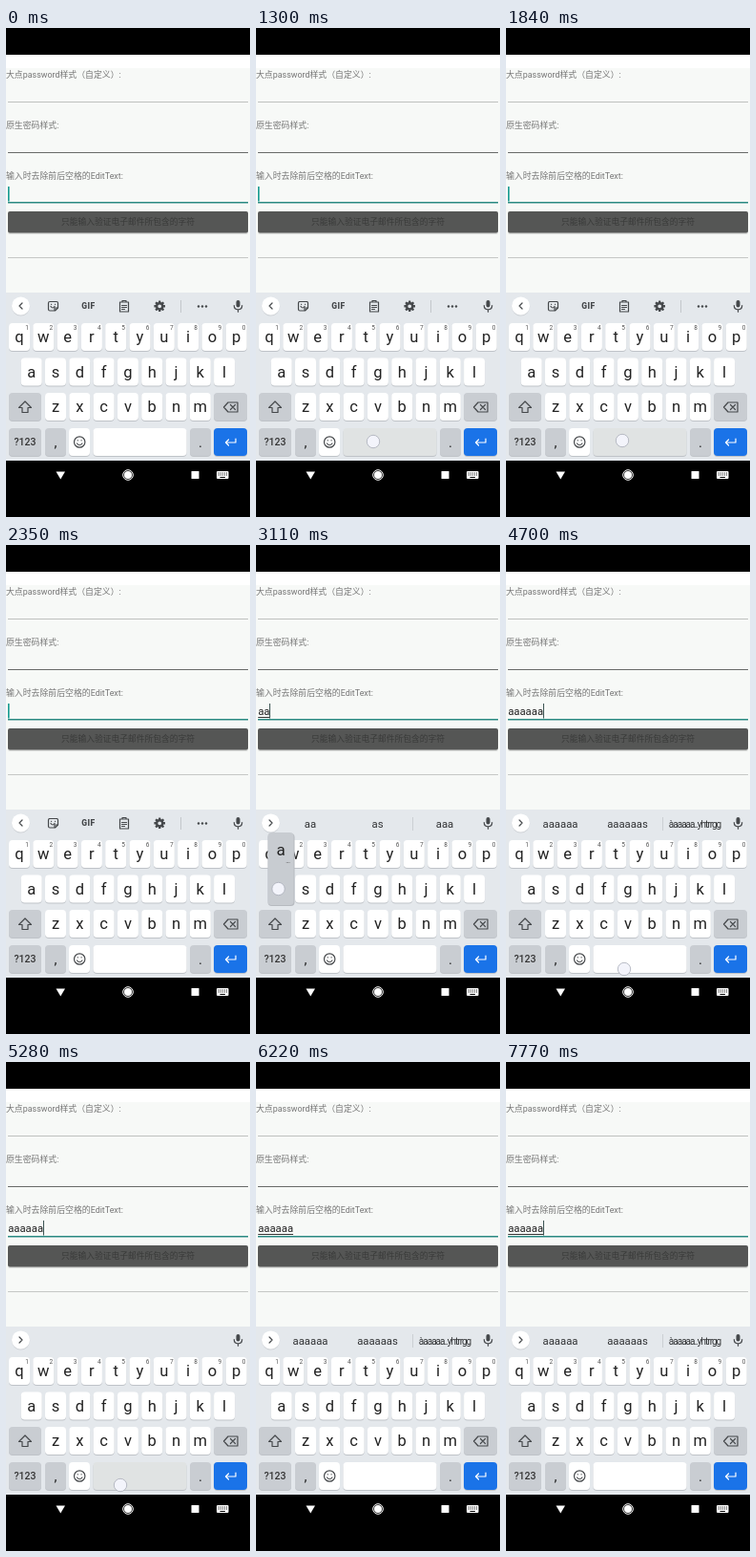
Write an HTML page that moves like this. It is 256 px wide and 512 px high and loops after 8050 ms.

```html
<!DOCTYPE html>
<html lang="zh">
<head>
<meta charset="utf-8">
<style>
  html, body { margin: 0; width: 100%; height: 100%; overflow: hidden; background: #000; }
  svg { display: block; width: 256px; height: 512px; }
  text { font-family: Roboto, "Noto Sans CJK SC", "Noto Sans CJK", sans-serif; white-space: pre; }
  .line { fill: none; stroke: #45484b; stroke-width: 1.2; stroke-linejoin: round; stroke-linecap: round; }
</style>
</head>
<body>
<svg id="stage" viewBox="0 0 256 512"></svg>
<script>
const LOOP = 8050;
const stage = document.getElementById('stage');

const rect = (x, y, w, h, fill, r = 0, extra = '') =>
  `<rect x="${x}" y="${y}" width="${w}" height="${h}" rx="${r}" fill="${fill}" ${extra}/>`;
const text = (x, y, s, size, fill = '#222', anchor = 'middle', extra = '') =>
  `<text x="${x}" y="${y}" font-size="${size}" fill="${fill}" text-anchor="${anchor}" ${extra}>${s}</text>`;
const line = (d, extra = '') => `<path class="line" d="${d}" ${extra}/>`;
const disc = (x, y, r, fill, extra = '') => `<circle cx="${x}" cy="${y}" r="${r}" fill="${fill}" ${extra}/>`;
const group = (id, body) => `<g id="${id}">${body}</g>`;

const GREY = '#c9cdd2', BLUE = '#1a73e8';
const key = (x, y, w, fill = '#fff', id = '') =>
  rect(x, y + 1, w, 29, '#bfc3c8', 4) + rect(x, y, w, 29, fill, 4, id && `id="${id}"`);

function letters(row, x, y, digits) {
  return [...row].map((c, i) => {
    const cx = x + i * 25.3;
    return key(cx - 11, y, 22) + text(cx, y + 20, c, 16.5) +
      (digits ? text(cx + 8, y + 7, (i + 1) % 10, 6.5, '#555') : '');
  }).join('');
}

function page() {
  const label = (y, s) => text(0, y, s, 8.9, '#757575', 'start');
  return rect(0, 28, 256, 249, '#f7f9f7') + rect(0, 28, 256, 14, '#fff') +
    label(52, '大点password样式（自定义）:') + rect(2, 77, 252, 1, '#bfc1bf') +
    label(105, '原生密码样式:') + rect(2, 130, 252, 1, '#686a69') +
    label(157.5, '输入时去除前后空格的EditText:') + rect(2, 182, 252, 1.5, '#2b8a82') +
    rect(2, 193, 252, 23, '#d9dbd9', 2) + rect(2, 192, 252, 22.5, '#555655', 2) +
    text(128, 206.3, '只能输入验证电子邮件所包含的字符', 8.75, '#393a39') +
    rect(2, 240, 252, 1, '#c6c8c6') +
    text(2.2, 178, '', 11.3, '#222', 'start', 'id="entry"') +
    rect(2.2, 180, 0, 1, '#333', 0, 'id="underline"') +
    rect(2, 166, 1, 15.5, '#2b8a82', 0, 'id="caret"');
}

function toolIcons() {
  const teeth = [...Array(8)].map((_, i) =>
    rect(160, 285.5, 2.4, 3, '#45484b', .5, `transform="rotate(${i * 45} 161.2 291.3)"`)).join('');
  return line('M46 286.5h7q1.5 0 1.5 1.5v5l-3 3H46q-1.500 0-1.500-1.500V288q0-1.500 1.500-1.500M54 293h-3v3M47 291.500q2 3 4 0M47.500 289.300h.1M51.500 289.300h.1') +
    text(86.5, 294.3, 'GIF', 8.5, '#45484b', 'middle', 'font-weight="900" letter-spacing=".5"') +
    line('M119.500 287h9v10h-9zM122 287v-1.500h4v1.500zM121.500 290.500h5M121.500 292.500h5M121.500 294.500h3') +
    teeth + disc(161.2, 291.3, 3.1, 'none', 'stroke="#45484b" stroke-width="2.4"') +
    rect(183, 285, 1, 13, '#c3c7cb') +
    [202, 206, 210].map(x => disc(x, 291.5, 1.2, '#45484b')).join('');
}

function keyboard() {
  return rect(0, 277, 256, 176, '#e4e8ec') +
    disc(15.5, 291.8, 9.7, '#cfd3d7') + disc(15.5, 291, 9.5, '#fff') +
    line('', 'id="chevron"') +
    group('tools', toolIcons()) +
    group('hints', [57, 127.5, 198].map(x => text(x, 295.5, '', 11.3, '#303234')).join('') +
      rect(164, 285, 1, 14, '#cbcfd3')) +
    rect(241.5, 285, 4, 7.5, '#45484b', 2) + line('M239.300 290.500q0 4.300 4.200 4.300t4.200-4.300M243.500 295v2.200') +
    letters('qwertyuiop', 14, 309, true) +
    letters('asdfghjkl', 26.7, 345.5) +
    key(3, 382, 34, GREY) + line('M20 391l-6.500 6.500h3.500v5h6v-5h3.500z') +
    letters('zxcvbnm', 52, 382) +
    key(218, 382, 35, GREY) + line('M233 392h10v10h-10l-4.500-5zM235.500 394.500l5 5M240.500 394.500l-5 5') +
    key(3, 419, 34, GREY) + text(20, 437.3, '?123', 10.5, '#333', 'middle', 'font-weight="500"') +
    key(41, 419, 22, GREY) + text(52, 439, ',', 15) +
    key(66, 419, 22) + line('M71.500 433.500a5.700 5.700 0 1 0 11.400 0a5.700 5.700 0 1 0-11.400 0M74.500 435q2.700 3.500 5.400 0M75.200 431.800h.2M79 431.800h.2') +
    key(91.5, 419, 98, '#fff', 'space') +
    key(193, 419, 22, GREY) + text(204, 439, '.', 15) +
    key(218, 419, 35, BLUE) + line('M241 430v4h-10M233.500 431l-3 3l3 3', 'style="stroke:#fff"') +
    group('popup', rect(12.5, 302, 28, 76, '#b6babf', 4) + rect(12.5, 301, 27, 76, '#c8ccd1', 4) +
      text(26, 325, 'a', 17) + text(33.5, 333, '…', 7, '#444')) +
    disc(0, 0, 6.7, '#f3f4fb', 'id="touch" stroke="#a9adb8" stroke-width=".8"');
}

const navBar = () =>
  '<path d="M52.500 464.500h9.500l-4.750 8z" fill="#fff"/>' +
  disc(128, 468, 5.3, 'none', 'stroke="#fff" stroke-width="1"') + disc(128, 468, 4, '#fff') +
  rect(194.5, 464, 8, 8, '#fff', .5) + rect(221, 464, 12.5, 8, '#fff', 1) +
  [0, 1, 2, 3, 4].map(i => rect(222.5 + i * 2.1, 465.5, 1, 1, '#000') +
    rect(222.5 + i * 2.1, 467.5, 1, 1, '#000')).join('') + rect(224.5, 470, 5.5, 1, '#000');

stage.innerHTML = rect(0, 0, 256, 512, '#000') + page() + keyboard() + navBar();

const el = id => document.getElementById(id);
const show = (id, on) => el(id).setAttribute('display', on ? 'inline' : 'none');
const set = (id, attrs) => Object.entries(attrs).forEach(([k, v]) => el(id).setAttribute(k, v));

// Each tap: start time, then the finger position.
const spaceTaps = [
  [1260, 123, 433], [1530, 124, 433], [1800, 122, 432], [2100, 126, 433],
  [4230, 122, 443], [4460, 123, 444], [4690, 124, 444],
  [4960, 122, 443], [5250, 120, 443], [5530, 121, 443]
];
const letterTaps = [2670, 2890, 3100, 3310, 3510, 3720].map(t => [t, 23.5, 360]);
const taps = [...spaceTaps, ...letterTaps].sort((a, b) => a[0] - b[0]);
const hints = [
  ['a', 'as', 'at'], ['aa', 'as', 'aaa'], ['aaa', 'aaaa', 'aa'],
  ['aaaa', 'aaaaa', 'aaaaaa'], ['aaaaa', 'aaaaaa', 'aaaaas'],
  ['aaaaaa', 'aaaaaas', 'àaaaaa..yhtrrgg']
];
const hintTexts = el('hints').querySelectorAll('text');
const within = (t, a, b) => t >= a && t < b;
const active = (list, t, a, b) => list.some(([start]) => within(t - start, a, b));

function draw(t) {
  const count = letterTaps.filter(([start]) => t >= start + 100).length;
  const end = 2.2 + 6.14 * count;

  el('entry').textContent = 'a'.repeat(count);
  set('underline', { width: end - 2.2 });
  show('underline', count && !within(t, 4250, 5780));
  set('caret', count
    ? { x: Math.round(end), width: 1, fill: '#3c5553' }
    : { x: 2, width: 1.6, fill: '#159a90' });
  show('caret', !within(t, 430, 980) && !within(t, 6220, 6760) && !within(t, 7260, 7770));

  set('chevron', { d: count ? 'M14 288l3 3l-3 3' : 'M17 288l-3 3l3 3' });
  show('tools', !count);
  show('hints', count && !active(spaceTaps, t, 20, 190));
  if (count) hints[count - 1].forEach((word, i) => {
    const long = word.length > 10;
    hintTexts[i].textContent = word;
    hintTexts[i].setAttribute('font-size', long ? 10 : 11.3);
    hintTexts[i].setAttribute('letter-spacing', long ? -1 : 0);
  });

  set('space', { fill: active(spaceTaps, t, 20, 140) ? '#e0e3e3' : '#fff' });
  show('popup', active(letterTaps, t, 0, 140));

  const tap = taps.filter(([start]) => start <= t).pop();
  const age = tap ? t - tap[0] : LOOP;
  show('touch', age < 250);
  if (age < 250) set('touch', { cx: tap[1], cy: tap[2], opacity: Math.min(1, (250 - age) / 110) });
}

const begin = performance.now();
function tick() {
  draw((performance.now() - begin) % LOOP);
  requestAnimationFrame(tick);
}
tick();
</script>
</body>
</html>
```
